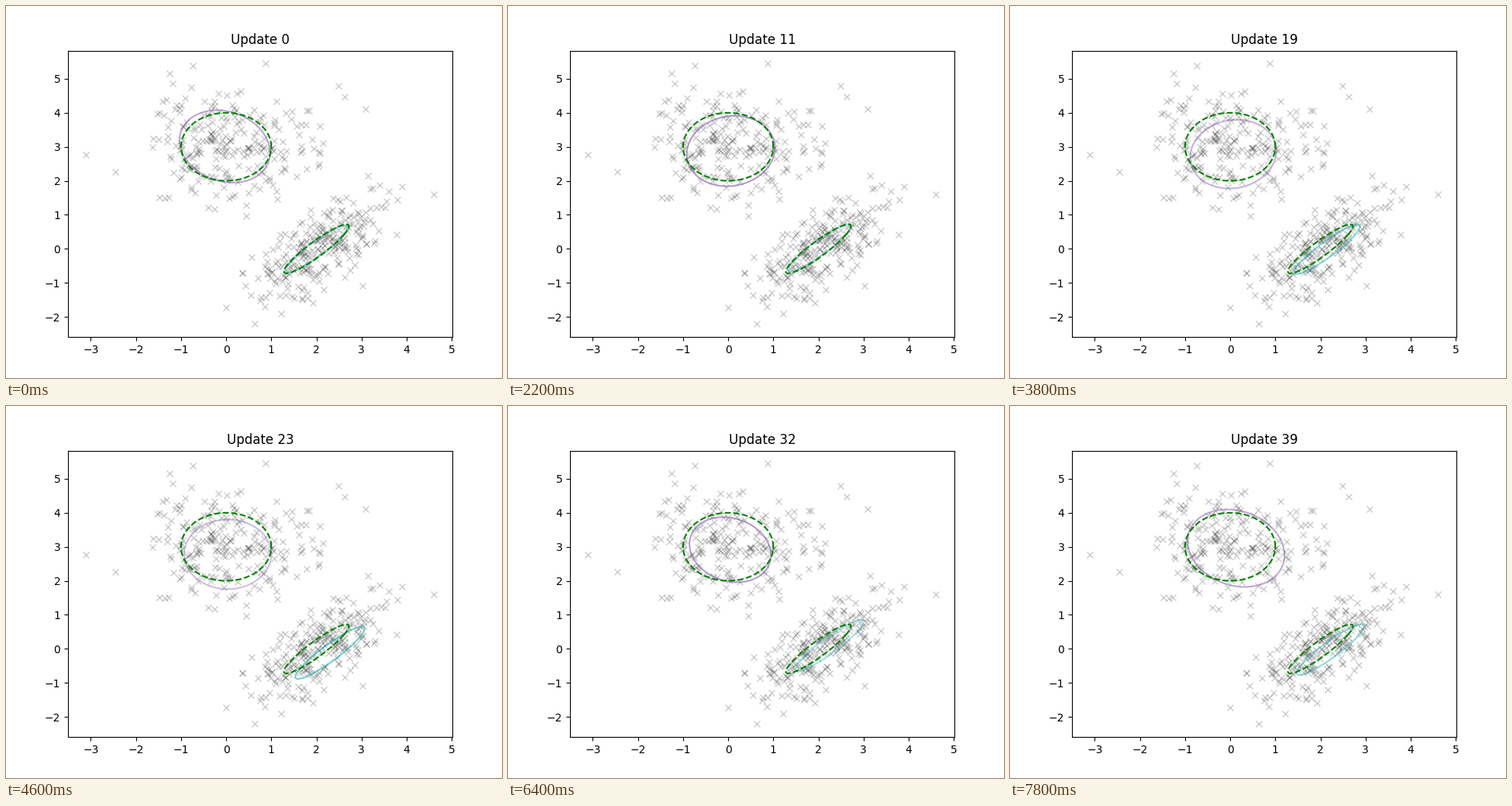
Animation, 640 px wide and 480 px high, one loop 8000 ms. Source, as a matplotlib script:

```python
import numpy as np
import matplotlib.pyplot as plt
from matplotlib.animation import FuncAnimation

FRAMES, INTERVAL = 40, 200
MEANS = np.array([[0, 3], [2, 0]])
COVS = np.array([[[1, 0], [0, 1]], [[.6, .4], [.4, .6]]])
COLORS = [(.53, .37, .69), (.1, .68, .7)]

# The most isolated samples
OUTLIERS = [(-3.11, 2.77), (-2.46, 2.27), (-1.26, 5.16), (-.74, 5.38),
            (.87, 5.45), (2.49, 4.79), (2.62, 4.47), (3.09, 4.11),
            (1.83, 4.07), (2.07, 3.61), (2.07, 2.81), (4.61, 1.61),
            (3.89, 1.83), (3.77, .42), (3.14, 2.15), (3.02, -1.08),
            (1.92, -1.58), (1.21, -1.9), (.64, -2.2), (-.01, -1.72)]

# update, upper x, y, size, tilt, lower x, y, weight of the upper component
KEYS = np.array([
    (0, -.03, 3.01, 1.00, -.09, 2.00, 0, .55),
    (7, .015, 2.96, 1.01, 0, 2.05, -.03, .72),
    (15, .10, 2.79, .94, .09, 2.00, .10, .53),
    (23, .035, 2.78, .965, 0, 2.30, -.115, .40),
    (28, .045, 2.835, 1.01, .06, 2.455, -.035, .65),
    (32, .045, 2.915, .90, -.08, 2.24, .10, .60),
    (39, .13, 2.96, 1.07, -.1, 2.225, -.02, .53)]).T

rng = np.random.default_rng(4)
t = np.linspace(0, 2 * np.pi, 101)
circle = np.array([np.cos(t), np.sin(t)])


def sample(mean, cov, count, radius):
    """Normal samples kept within a Mahalanobis radius."""
    z = rng.standard_normal((count * 2, 2))
    z = z[np.hypot(*z.T) < radius][:count]
    return mean + z @ np.linalg.cholesky(cov).T


def ellipse(mean, shape):
    return np.reshape(mean, (2, 1)) + shape @ circle


def estimates(i):
    """Mean, shape matrix and weight of both components at update i."""
    ux, uy, size, tilt, lx, ly, weight = (np.interp(i, KEYS[0], k)
                                          for k in KEYS[1:])
    upper = np.array([[size, tilt], [tilt, 1.06 * size]])
    lower = COVS[1] * (.96 + .35 * (lx - MEANS[1, 0]))
    return [((ux, uy), upper, weight), ((lx, ly), lower, 1 - weight)]


points = np.vstack([OUTLIERS,
                    sample(MEANS[0], COVS[0], 235, 2.2),
                    sample(MEANS[1], COVS[1], 245, 2.5)])

fig, ax = plt.subplots(figsize=(6.4, 4.8), dpi=100)
ax.plot(*points.T, 'kx', alpha=.2)
lines = [ax.plot([], [], color=c)[0] for c in COLORS]
for mean, cov in zip(MEANS, COVS):
    ax.plot(*ellipse(mean, cov), 'g--')
ax.set_xlim(-3.506, 5.014)
ax.set_ylim(-2.593, 5.827)
title = ax.set_title('Update 0')


def update(i):
    title.set_text(f'Update {i}')
    for line, (mean, shape, weight) in zip(lines, estimates(i)):
        line.set_data(*ellipse(mean, shape))
        line.set_alpha(weight)
    return [title, *lines]


anim = FuncAnimation(fig, update, frames=FRAMES, interval=INTERVAL,
                     repeat=True, repeat_delay=0)
plt.show()
```
